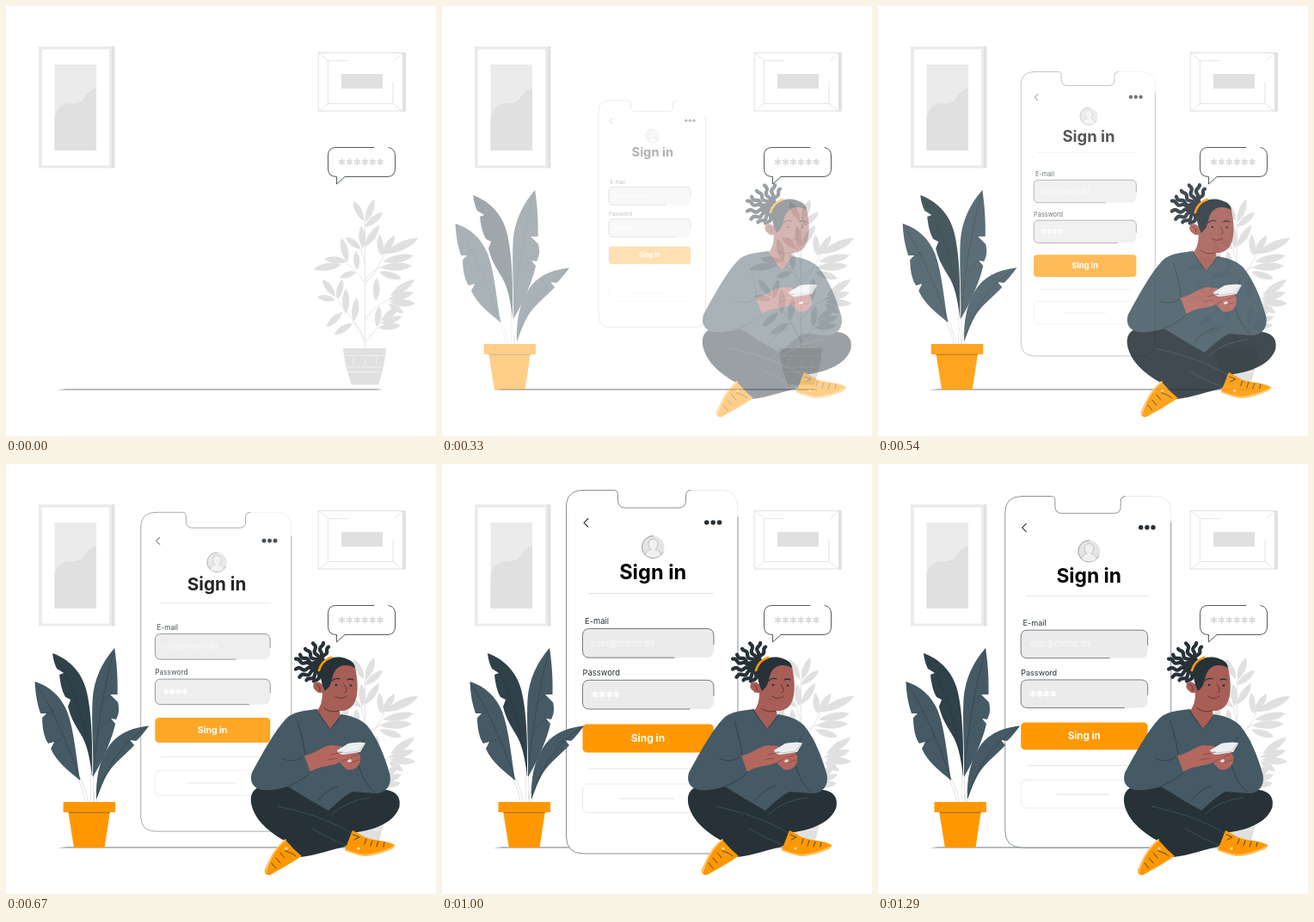
An HTML page with a canvas that plays this animation: 500 px wide and 500 px high, repeating every 1330 ms.

```html
<!DOCTYPE html>
<html lang="en">
<head>
<meta charset="utf-8">
<title>Sign in</title>
<style>
html, body { margin: 0; width: 100%; height: 100%; overflow: hidden; background: #fff; }
canvas { display: block; width: 500px; height: 500px; }
</style>
</head>
<body>
<canvas id="stage" width="500" height="500"></canvas>
<script>
const LOOP = 1330;
const DARK = '#263238', SLATE = '#455a64', ORANGE = '#ff9800';
const PALE = '#ebebeb', GREY = '#e0e0e0', SKIN = '#a65e56', HAND = '#b3675f';
const FONT = 'Inter, "Open Sans", sans-serif';

const stage = document.getElementById('stage').getContext('2d');
const layer = document.createElement('canvas');
layer.width = layer.height = 500;
const layerCtx = layer.getContext('2d');
let c = stage;

// Drawing helpers
function fill(d, color) {
  c.fillStyle = color;
  c.fill(new Path2D(d));
}
function line(d, color = DARK, width = 0.7) {
  c.strokeStyle = color;
  c.lineWidth = width;
  c.stroke(new Path2D(d));
}
function rect(x, y, w, h, color) {
  c.fillStyle = color;
  c.fillRect(x, y, w, h);
}
function round(x, y, w, h, r, color, border) {
  c.beginPath();
  c.roundRect(x, y, w, h, r);
  if (color) { c.fillStyle = color; c.fill(); }
  if (border) { c.strokeStyle = border; c.lineWidth = 0.8; c.stroke(); }
}
function dot(x, y, r, color) {
  c.fillStyle = color;
  c.beginPath();
  c.arc(x, y, r, 0, 7);
  c.fill();
}
function text(str, x, y, size, weight, color, align = 'left') {
  c.font = `${weight} ${size}px ${FONT}`;
  c.textAlign = align;
  c.fillStyle = color;
  c.fillText(str, x, y);
}
function asterisks(x, y, count, step, color) {
  c.strokeStyle = color;
  c.lineWidth = 1.7;
  c.beginPath();
  for (let i = 0; i < count; i++) {
    for (let k = 0; k < 3; k++) {
      const a = Math.PI / 2 + k * Math.PI / 3, dx = 3.3 * Math.cos(a), dy = 3.3 * Math.sin(a);
      c.moveTo(x + i * step - dx, y - dy);
      c.lineTo(x + i * step + dx, y + dy);
    }
  }
  c.stroke();
}
function leaf(x, y, tipX, tipY) {
  const dx = tipX - x, dy = tipY - y, len = Math.hypot(dx, dy);
  const w = (3 + len * 0.09) / len, nx = -dy * w, ny = dx * w;
  const at = (k, s) => `${x + dx * k + nx * s} ${y + dy * k + ny * s}`;
  fill(`M${x} ${y}C${at(0.3, 1)} ${at(0.75, 1)} ${tipX} ${tipY}C${at(0.75, -0.9)} ${at(0.3, -0.9)} ${x} ${y}`, GREY);
}

// Room
function drawPictures() {
  rect(38, 47, 85, 141.5, PALE);
  rect(123, 47, 3.4, 141.5, GREY);
  rect(42, 50.5, 78, 135, '#fff');
  rect(56.5, 68, 48.5, 100, PALE);
  fill('M56.5 168V132C57 121 64 114 74 113C82 113 87 113 91 107C95 101 98 97 105 95.5V168Z', GREY);

  line('M363.5 54.5H464V122H363.5Z', GREY, 1);
  rect(461, 54.5, 3.8, 68, GREY);
  line('M397 63.5H374.5V113.5H450V88M364 55L374.5 63.5M364 122L374.5 113.5M461 55L451 64M461 122L450 113.5', GREY, 0.8);
  rect(390, 79, 48, 17, GREY);
}
function drawBubble() {
  line('M428 164.5H384Q374.5 164.5 374.5 174V189Q374.5 198.5 384.5 198.5V207L394 198.5H443Q452.5 198.5 452.5 189V174Q452.5 166 445 164.5', DARK, 0.8);
  asterisks(390.6, 181.3, 6, 8.9, '#d8d8d8');
}
const greyLeaves = [
  [[416, 250], [404, 227]], [[418, 251], [428, 225]], [[417, 257], [438, 240]],
  [[415, 282], [413, 256]], [[417, 280], [434, 255]], [[413, 283], [395, 269]],
  [[436, 290], [434, 266]], [[437, 290], [452, 267]], [[440, 288], [479, 270]],
  [[438, 297], [474, 290]], [[435, 304], [472, 302]], [[434, 309], [460, 317]]
];
const greyLeavesLow = [
  [[397, 298], [390, 270]], [[397, 297], [370, 294]], [[390, 301], [358, 306]],
  [[407, 309], [388, 316]], [[408, 307], [407, 285]], [[430, 343], [431, 316]],
  [[383, 338], [368, 318]], [[385, 341], [391, 318]], [[383, 342], [362, 338]],
  [[395, 358], [395, 329]], [[404, 367], [408, 339]], [[391, 356], [373, 373]],
  [[403, 369], [382, 382]], [[447, 337], [475, 318]], [[445, 341], [474, 333]],
  [[446, 344], [476, 346]], [[445, 346], [462, 357]], [[431, 373], [434, 349]],
  [[436, 366], [458, 349]], [[436, 369], [460, 361]], [[433, 374], [459, 371]]
];
function drawGreyPlant() {
  line('M417.5 398V250M417 390Q410 370 386 343M417 390Q414 378 404 368M417 322Q407 306 395 299M417 300Q415 290 413 283'
    + 'M418 322Q428 314 440 289M418 318Q424 308 436 303M418 364Q430 346 447 341M418 390Q426 384 436 367', GREY, 0.8);
  for (const [base, tip] of greyLeaves.concat(greyLeavesLow)) leaf(...base, ...tip);
  fill('M392 398H442Q440 420 433 440.5H402Q394 420 392 398Z', GREY);
  line('M394 406.5H440M396 420H438M398 425.5H436M404 409V417M418 409V417M431 409V417', '#f5f5f5', 0.8);
}
function drawRoom() {
  drawPictures();
  drawBubble();
  drawGreyPlant();
  fill('M60 446.4L70 445H430L438.5 446L430 446.8H70Z', '#aeb2b4');
}

// Phone with the form
function drawField(y, bottomEnd) {
  round(163.5, y, 152.5, 33.7, 8, PALE);
  line(`M${bottomEnd} ${y + 33.7}H171.5q-8 0 -8 -8V${y + 8}q0 -8 8 -8H308q8 0 8 8v10`, '#5a6268', 0.85);
}
function drawPhone() {
  const notch = 'M164.5 30.5H200Q204.5 30.5 204.5 36V42Q204.5 51 213 51H275Q283.5 51 283.5 43V37Q283.5 30.5 289 30.5';
  const corner = 'H324Q344 30.5 344 50V62';
  const sides = 'V433Q344 453 324 453H164.5Q144.5 453 144.5 433V50Q144.5 30.5 164.5 30.5';
  fill(notch + corner + sides, '#fff');
  line('M289 30.5' + corner, '#dfe1e2', 0.7);
  line(notch + 'M344 62' + sides, '#546066', 0.7);
  line('M169.8 63.5L165 68.3L169.8 73', DARK, 1.1);
  for (const x of [307.8, 315.2, 322.6]) dot(x, 68, 2.8, DARK);

  dot(245.5, 96.5, 13, '#e4e4e4');
  line('M245.5 83.5A13 13 0 1 0 257 102.5', '#7c8388', 0.8);
  const person = 'M236.5 106Q237 100.5 243 99.5Q239.5 97 240 92Q241 87.5 245.5 87.5Q250 87.5 251 92Q251 97 248 99.5Q254 100.5 254.5 106';
  fill(person + 'Q246 112 236.5 106Z', '#f0f0f0');
  line(person, '#a5aaad', 0.6);

  text('Sign in', 245.2, 134.3, 23.6, 700, '#000', 'center');
  line('M170 150.5H316', '#dcdcdc', 0.8);

  text('E-mail', 166, 186, 9.4, 400, DARK);
  drawField(191.5, 270);
  text('user@memo.tld', 174, 211.5, 9.8, 400, '#fafafa');

  text('Password', 163.5, 245.7, 9.4, 400, DARK);
  drawField(251.3, 288);
  asterisks(178, 268, 4, 8.2, '#fff');

  round(163.5, 302.5, 152.5, 33, 5, ORANGE);
  text('Sing in', 239.5, 322.8, 11.9, 700, '#fff', 'center');
  line('M171 354.3H309', '#dedede', 0.8);
  round(163.5, 372, 152.5, 33.5, 6, null, '#e4e4e4');
  line('M207 389H270', '#d8d8d8', 0.8);
}

// Potted plant on the left
function drawPlant() {
  const stems = 'M84 366Q90 378 93 393M99 362Q100 378 98.5 393M105 380Q102 386 103 393';
  line(stems, '#c4c9cc', 3.4);
  line(stems, '#fff', 2.6);
  fill('M53 220C71 226 87 242 92 262C97 281 100 312 99 364C97 347 95 332 88 318C81 306 74 296 71 282L74 274L68 271C64 264 62 255 61 245L66 243L58 238Q54 230 53 220Z', '#2f4149');
  fill('M125 214C128 232 129 253 128.5 268L120 268L129 277C131 286 130 291 127 297L121 296L126 302C123 317 113 342 100 364C101 340 98 302 99.5 274C101 250 111 230 125 214Z', SLATE);
  fill('M32.5 253C49 258 63 270 70 288C78 309 80 338 85 368C71 356 58 347 51 331L55 323L48 325C43 318 41 306 41 295L46 290L39 290C35 278 33 267 32.5 253Z', SLATE);
  fill('M165 304.5C158 314 153 320 150 322L143 321L148 327C139 337 125 347 117 360C111 370 108 380 104 390C103 366 107 344 120 326C132 311 149 306 165 304.5Z', SLATE);
  line('M33 254Q62 298 85 367M54 221Q84 262 98 350M125 215Q107 278 100 362M164 305Q121 332 104 388', '#263238aa', 0.6);
  line('M46 290L55 287M55 323L64 320M71 282L80 274M120 268L111 277M121 296L107 309M143 321L135 324', '#26323888', 0.5);
  rect(65.5, 393, 60.5, 12, ORANGE);
  fill('M71.3 405H119.7L113.5 446H77.8Z', ORANGE);
  line('M72 405.3H119.5', '#7a5012', 0.7);
}

// Seated man
function dread(tipX, tipY, phase) {
  const x0 = 369, y0 = 234, dx = tipX - x0, dy = tipY - y0, len = Math.hypot(dx, dy);
  c.strokeStyle = DARK;
  c.lineWidth = 4.2;
  c.beginPath();
  for (let i = 0; i <= 30; i++) {
    const k = i / 30, bend = 1.3 * Math.sin(k * len / 1.9 + phase) - 2 * Math.sin(k * Math.PI);
    c.lineTo(x0 + dx * k - dy / len * bend, y0 + dy * k + dx / len * bend);
  }
  c.stroke();
}
function drawHead() {
  const tips = [[377, 213], [369, 208], [359, 208], [350, 214], [343, 222], [338, 227], [338, 238], [342, 247], [351, 252], [360, 253]];
  tips.forEach(([x, y], i) => dread(x, y, i));
  fill('M362 264Q357 261 359 255Q363 251 369 256L376 240Q390 229 407 236C409 246 411 258 409 269C407 281 400 288 389 287L390 293Q386 303 378 308Q368 299 362 287Q369 282 369 266Q364 267 362 264Z', SKIN);
  fill('M366 240C368 228 381 223 392 225C401 227 407 231 407 237C399 233 391 233 386 238C380 243 381 252 377 259L372 264Q367 254 366 240Z', DARK);
  line('M379 225Q368 229 365 240', ORANGE, 2.8);
  line('M380 252Q384 248 389 250M398 251Q402 249 405 251', DARK, 1.3);
  dot(385, 257, 1.3, DARK);
  dot(402, 257.5, 1.3, DARK);
  line('M394 256Q400 264 395 266M384 270Q390 275 397 270M371 284Q379 290 388 287M363 257Q367 258 366 263', '#5c2e2c', 0.9);
}
function drawTrousers() {
  fill('M304 374C290 375 285 382 286 393C288 409 302 426 327 439C333 444 338 452 344 457C362 455 381 448 398 444L403 429C431 426 453 416 458.5 399C461 387 454 379 440 379L375 377Z', DARK);
  line('M318 398C345 404 377 413 404 430M398 444Q378 436 357 424M425 388Q400 390 380 407', '#516169', 0.6);
}
function drawSweater() {
  fill('M362 285C347 287 335 288 327 296C313 311 300 335 287 359C284 369 288 377 299 379C309 380 319 378 329 375C345 385 360 394 376 403C384 396 394 386 404 381L430 383C442 383 450 375 447.5 361C441 338 433 319 421 304C412 295 401 293 391 291L378 308Z', SLATE);
  line('M362 285Q369 299 378 308Q385 302 391 291M340 299Q347 321 349 339M329 375Q348 367 357 357M323 343Q337 348 346 341M411 350Q409 332 418 318M364 391Q377 376 387 375M411 350Q417 372 430 382', DARK, 0.6);
}
function drawHands() {
  fill('M348 339C360 338 368 328 379 327L391 328L393 337L407 335C413 335 414 341 413 346C411 354 403 357 397 355L389 347C380 352 367 350 355 358Z', HAND);
  fill('M386 333L399 325Q417 322 419 325L413 335L393 338Q387 337 386 333Z', '#eceff1');
  line('M387 334L394 336L411 334L418 325', '#b0b8bc', 0.7);
  fill('M390 341Q395 336 398 342L407 336Q412 336 411 341Q414 342 412 346Q412 351 405 354L396 353Q390 348 390 341Z', HAND);
  line('M379 338L392 335M390 347L397 343M402 341L410 338M403 347L412 344M375 344L386 342', '#733d3a', 0.6);
  fill('M398 345L402 343L403 346L399 347Z', '#f5e6e4');
}
function drawShoes() {
  fill('M326 437Q334 447 345 456C333 464 320 471 308 478Q301 478 302 472C307 460 315 445 326 437Z', ORANGE);
  line('M326 437C315 446 307 460 303 475', '#ffc46b', 1.8);
  line('M320 452L325 458M315 458L320 464M310 464L315 470M326 450Q334 452 338 456', DARK, 0.8);
  dot(327, 447, 1.6, '#ffe0b2');
  fill('M404 426C410 428 416 434 425 436C435 438 447 439 453 443Q453 447 446 449C437 453 425 456 417 456Q404 453 395 449Z', ORANGE);
  line('M396 449Q409 454 418 455Q437 453 452 445', '#ffc46b', 1.8);
  line('M420 436L418 442M427 438L425 444M434 439L432 445M441 440L440 445M405 431L412 434L406 437', DARK, 0.8);
  dot(411, 447, 1.6, '#ffe0b2');
}
function drawMan() {
  drawTrousers();
  drawHead();
  drawSweater();
  drawHands();
  drawShoes();
}

// Motion
const ease = k => (1 - Math.cos(Math.PI * Math.min(1, Math.max(0, k)))) / 2;

function slideOffset(t) {
  return t < 750 ? 30 - 32 * ease(t / 750) : -2 * (1 - ease((t - 750) / 250));
}
function phoneScale(t) {
  const shrink = Math.max(0, t - 1110) / 180;
  return 0.5 + 0.5 * ease(t / 1000) - 0.033 * shrink ** 1.6;
}
function group(opacity, place, draw) {
  c = layerCtx;
  c.setTransform(1, 0, 0, 1, 0, 0);
  c.clearRect(0, 0, 500, 500);
  place(c);
  draw();
  c = stage;
  c.globalAlpha = opacity;
  c.drawImage(layer, 0, 0);
  c.globalAlpha = 1;
}
function render() {
  const t = performance.now() % LOOP;
  const slide = slideOffset(t), appear = ease(t / 700), scale = phoneScale(t);
  c = stage;
  rect(0, 0, 500, 500, '#fff');
  drawRoom();
  group(ease(t / 900), g => {
    g.translate(244.25, 241.5);
    g.scale(scale, scale);
    g.translate(-244.25, -241.5);
  }, drawPhone);
  group(appear, g => g.translate(-slide, 0), drawPlant);
  group(appear, g => g.translate(slide, 0), drawMan);
  requestAnimationFrame(render);
}
for (const ctx of [stage, layerCtx]) ctx.lineCap = ctx.lineJoin = 'round';
render();
</script>
</body>
</html>
```
